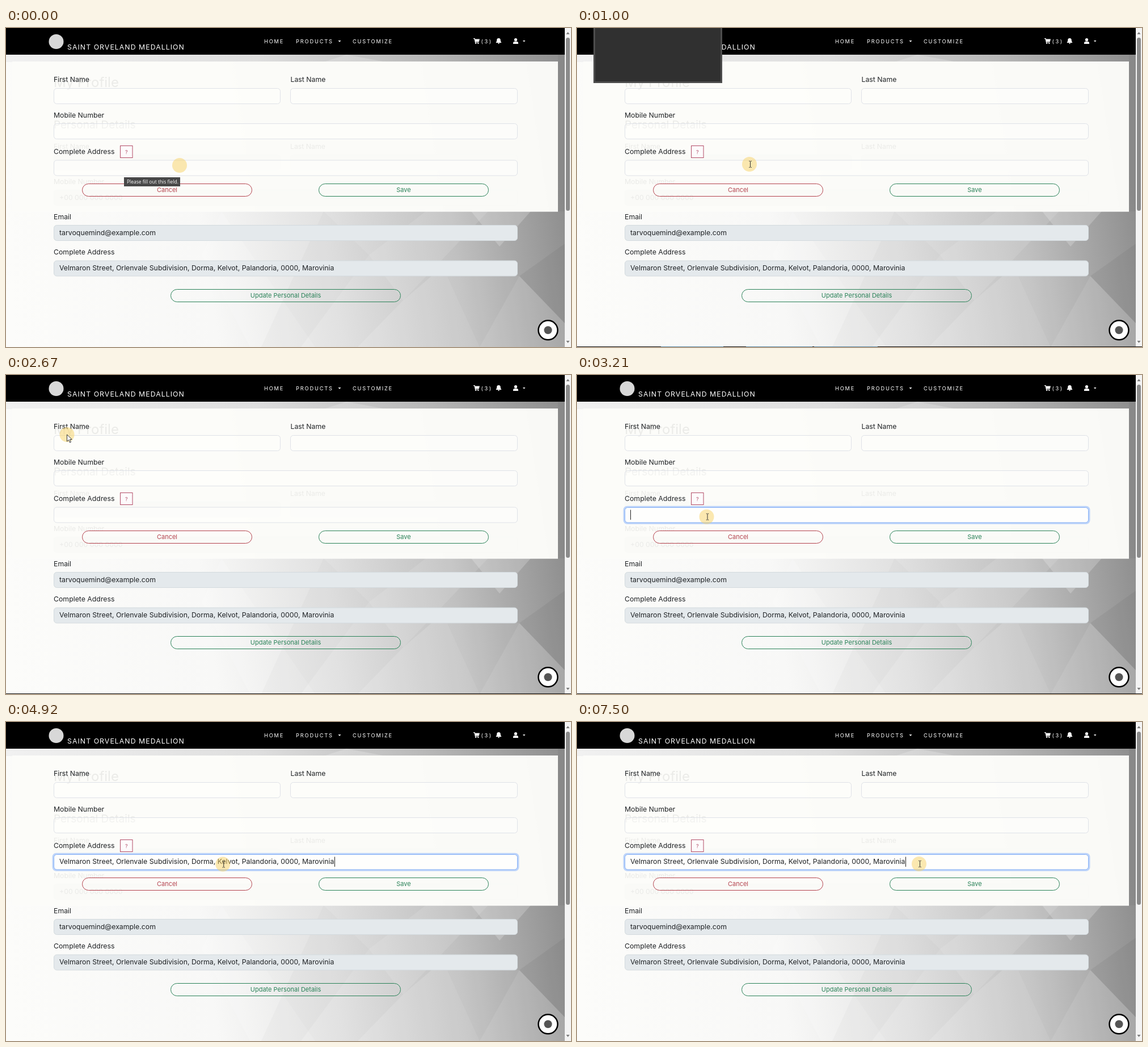
Recreate the animation shown at these times as an HTML page. Size 996 px wide and 562 px high, loop 7.54 s.

```html
<!DOCTYPE html>
<html lang="en">
<head>
<meta charset="utf-8">
<title>Profile form</title>
<style>
  html, body { margin: 0; width: 100%; height: 100%; overflow: hidden; background: #fff; }
  svg { display: block; width: 100%; height: 100%; }
  text { font: 12.3px Inter, sans-serif; fill: #202326; white-space: pre; }
  .nav { font-size: 9.3px; letter-spacing: 1.8px; fill: #fff; }
  .brand { letter-spacing: 1.05px; fill: #fff; }
  .pill { font-size: 11px; text-anchor: middle; }
  .system { font: 8.5px "Open Sans", "Noto Sans", sans-serif; fill: #fff; }
  .strong { font-size: 9.4px; font-weight: 600; }
  .choice { font-size: 9.2px; text-anchor: middle; }
</style>
</head>
<body>
<svg id="stage" viewBox="0 0 996 562" preserveAspectRatio="none">
  <defs>
    <linearGradient id="shade" gradientUnits="userSpaceOnUse" x1="0" y1="480" x2="985" y2="330">
      <stop offset="0" stop-color="#fcfcfa"/>
      <stop offset=".36" stop-color="#f8f8f7"/>
      <stop offset=".58" stop-color="#e1e1e1"/>
      <stop offset=".8" stop-color="#c0c0c0"/>
      <stop offset="1" stop-color="#8f8f8f"/>
    </linearGradient>
    <linearGradient id="band">
      <stop offset="0" stop-color="#f1f1f1"/>
      <stop offset=".45" stop-color="#dedede"/>
      <stop offset=".75" stop-color="#b8b8b8"/>
      <stop offset="1" stop-color="#8e8e8e"/>
    </linearGradient>
  </defs>
  <g id="page"></g>
  <g id="form"></g>
  <g id="focus">
    <rect x="81.5" y="230.7" width="823" height="32" rx="7" fill="#bdd4fa"/>
    <rect x="84.5" y="233.5" width="817" height="26.5" rx="5" fill="#fefefd" stroke="#86b0f5"/>
    <text id="typed" x="94" y="250.3"></text>
    <path id="caret" stroke="#222"/>
  </g>
  <g id="tooltip">
    <rect width="99" height="16" fill="#484848"/>
    <text class="system" x="5" y="11.2">Please fill out this field.</text>
  </g>
  <g id="popup">
    <rect x="29" width="227" height="97" fill="#4d4d4d"/>
    <rect id="popupBody" x="32" width="221" height="94"/>
    <g id="popupContent">
      <text class="system strong" x="42" y="20">http://localhost wants to</text>
      <path d="M232 9l9 9M241 9l-9 9M49 46c-3-3.500-4.800-5-4.800-7.300a4.800 4.800 0 0 1 9.600 0c0 2.300-1.800 3.800-4.800 7.300z" fill="none" stroke="#e8e8e8"/>
      <circle cx="49" cy="39" r="1.700" fill="none" stroke="#e8e8e8"/>
      <text class="system" x="60.500" y="43">Know your location</text>
      <rect x="41" y="61" width="99" height="23" fill="#595959"/>
      <rect x="146.500" y="61.500" width="97" height="22" fill="#4b4b4b" stroke="#d8d8d8"/>
      <text class="system choice" x="91" y="76">Allow</text>
      <text class="system choice" x="194.500" y="76">Block</text>
    </g>
  </g>
  <g id="taskbar">
    <path d="M0 561.500H996" stroke="#111"/>
    <path id="taskItems" d="M148 561.500h110M298 561.500h117M418 561.500h112" stroke="#5f8ba6"/>
  </g>
  <g id="pointer">
    <circle r="13" fill="#f8d164" fill-opacity=".5"/>
    <path id="arrow" d="M0 0V12L3 9.300L5 14L7 13.100L5 8.600H8.800Z" fill="#fff" stroke="#222" stroke-width=".9"/>
    <path id="beam" d="M-.7-5.500H1M2-5.500H3.700M1.500-5V5M-.7 5.500H1M2 5.500H3.700" fill="none" stroke="#333"/>
  </g>
</svg>
<script>
const LOOP = 7540;
const ADDRESS = "Velmaron Street, Orlenvale Subdivision, Dorma, Kelvot, Palandoria, 0000, Marovinia";
const GREEN = "#2a8258", RED = "#b4434e";
const $ = id => document.getElementById(id);

function add(parent, tag, attrs, content = "") {
  const node = document.createElementNS("http://www.w3.org/2000/svg", tag);
  for (const key in attrs) node.setAttribute(key, attrs[key]);
  node.textContent = content;
  return parent.appendChild(node);
}
const rect = (p, x, y, width, height, fill, more) => add(p, "rect", { x, y, width, height, fill, ...more });
const label = (p, x, y, content, more) => add(p, "text", { x, y, ...more }, content);
const shape = (p, d, fill, more) => add(p, "path", { d, fill, ...more });

function field(p, x, y, width, fill, stroke, value) {
  rect(p, x + .5, y + .5, width - 1, 27, fill, { rx: 5, stroke });
  if (value) label(p, x + 10, y + 17.8, value);
}
function pill(p, x, y, width, color, content) {
  rect(p, x + .5, y + .5, width - 1, 22, "none", { rx: 11, stroke: color });
  label(p, x + width / 2, y + 15.3, content, { class: "pill", style: `fill:${color}` });
}

function drawBackdrop(p) {
  rect(p, 0, 0, 996, 562, "url(#shade)");
  rect(p, 0, 47, 985, 13, "url(#band)");
  const facets = [
    ["M380 323L545 562H430L345 400Z", "#fff", .12],
    ["M560 323L640 400L520 562H450Z", "#888", .05],
    ["M640 400L740 323H850L700 480Z", "#fff", .1],
    ["M700 480L620 562H835L770 420Z", "#fff", .14],
    ["M820 323H925L870 385Z", "#fff", .2],
    ["M770 420L905 437L835 562Z", "#fff", .08],
    ["M905 437L985 520V562H835Z", "#fff", .16],
    ["M905 437L985 380V520Z", "#555", .1],
    ["M600 47L670 60H560Z", "#fff", .2],
    ["M973 47H985V323H973Z", "#777", .25]
  ];
  for (const [d, fill, opacity] of facets) shape(p, d, fill, { opacity });
  rect(p, 11, 59, 962, 264.5, "#fff", { opacity: .7 });
}

function drawHeader(p) {
  rect(p, 0, 0, 985, 47, "#000");
  add(p, "circle", { cx: 88.5, cy: 24, r: 13, fill: "#d8d8d8" });
  label(p, 108, 38, "SAINT ORVELAND MEDALLION", { class: "brand" });
  label(p, 455, 26.5, "HOME", { class: "nav" });
  label(p, 511, 26.5, "PRODUCTS", { class: "nav" });
  label(p, 611, 26.5, "CUSTOMIZE", { class: "nav" });
  label(p, 837.5, 26.7, "(3)", { class: "nav", style: "letter-spacing:2.6px" });
  shape(p, "M585.500 22h5l-2.500 2.700zM911 22h4.500l-2.250 2.500z", "#fff");
  shape(p, "M824 18h2.500l.4 1.500H835l-1.300 5h-5.800l.2 1h5.300v1h-6.300L825.500 19.200H824z", "#fff");
  for (const cx of [828, 832.5]) add(p, "circle", { cx, cy: 27, r: 1.1, fill: "#fff" });
  shape(p, "M868.500 18c2.500 0 3.300 1.600 3.300 3.600 0 2 .6 2.700 1.400 3.600v.8h-9.400v-.8c.8-.9 1.400-1.600 1.400-3.600 0-2 .8-3.600 3.300-3.600zM867 26.600h3a1.500 1.500 0 0 1-3 0z", "#fff");
  add(p, "circle", { cx: 898.5, cy: 20.7, r: 2.6, fill: "#fff" });
  shape(p, "M894 28v-1.500c0-1.700 1.300-2.700 3-2.700h3c1.700 0 3 1 3 2.700V28z", "#fff");
}

function drawPage() {
  const p = $("page"), fill = "#e4e9ec", edge = "#d3dade";
  drawBackdrop(p);
  drawHeader(p);
  label(p, 84, 104, "My Profile", { style: "font-size:24px" });
  label(p, 84, 177, "Personal Details", { style: "font-size:19px" });
  label(p, 84, 213, "First Name");
  label(p, 501, 213, "Last Name");
  field(p, 84, 223, 400, fill, edge);
  field(p, 501, 223, 401, fill, edge);
  label(p, 84, 275, "Mobile Number");
  field(p, 84, 285, 818, fill, edge, "+00 000 000 0000");
  label(p, 84, 337, "Email");
  field(p, 84, 347, 818, fill, edge, "tarvoquemind@example.com");
  label(p, 84, 399, "Complete Address");
  field(p, 84, 409.5, 818, fill, edge, ADDRESS);
  pill(p, 290, 460, 406, GREEN, "Update Personal Details");
  add(p, "circle", { cx: 955.5, cy: 532.3, r: 17, fill: "#fff", stroke: "#000", "stroke-width": 2.5 });
  add(p, "circle", { cx: 955.5, cy: 532.3, r: 7, fill: "#555" });
  rect(p, 985, 0, 11, 562, "#f4f4f4");
  rect(p, 987, 17, 7, 305, "#8b8b8b", { rx: 3.5 });
  shape(p, "M987.500 11l3-4 3 4zM987.500 551l3 4 3-4z", "#7c7c7c");
}

function drawForm() {
  const p = $("form"), fill = "rgba(255,255,253,.4)", edge = "#dfe2e8";
  rect(p, 11, 59, 962, 264.5, "#fcfcf9", { opacity: .92 });
  label(p, 84, 95.3, "First Name");
  field(p, 84, 106, 400, fill, edge);
  label(p, 501.5, 95.3, "Last Name");
  field(p, 501, 106, 401, fill, edge);
  label(p, 84, 157.5, "Mobile Number");
  field(p, 84, 168, 818, fill, edge);
  label(p, 84, 222, "Complete Address");
  rect(p, 201.5, 207.5, 21.5, 21, "#fdfbfc", { stroke: "#b24a66" });
  label(p, 212.3, 221.6, "?", { style: "font-size:9px;fill:#b24a66;text-anchor:middle" });
  field(p, 84, 232.5, 818, fill, edge);
  pill(p, 134, 274, 300, RED, "Cancel");
  pill(p, 551, 274, 300, GREEN, "Save");
}

const PATH = [
  [90, 306, 242], [400, 212, 219], [560, 212, 218], [860, 304, 240], [1210, 304, 240],
  [1750, 116, 100], [2000, 92, 76], [2250, 92, 76], [2670, 107.5, 105], [3000, 226, 249],
  [3500, 232.5, 251], [4550, 232.5, 251], [5400, 602, 250], [6750, 602, 250], [7000, 603, 250]
];

function pointerAt(t) {
  const next = PATH.findIndex(key => key[0] > t);
  if (next === 0) return PATH[0].slice(1);
  if (next < 0) return PATH[PATH.length - 1].slice(1);
  const [t0, x0, y0] = PATH[next - 1], [t1, x1, y1] = PATH[next];
  const u = (t - t0) / (t1 - t0), k = u * u * (3 - 2 * u);
  return [x0 + (x1 - x0) * k, y0 + (y1 - y0) * k];
}

const show = (id, visible) => $(id).setAttribute("display", visible ? "inline" : "none");
const during = (t, from, to) => t >= from && t < to;
const overField = (x, y) => x > 84 && x < 902 &&
  [[106, 134], [168, 196], [233, 260]].some(([top, bottom]) => y >= top && y <= bottom);

const FOCUS = 3000, FILL = 4500;

function render(t) {
  const [x, y] = pointerAt(t);
  const beam = overField(x, y);
  $("pointer").setAttribute("transform", `translate(${x} ${y})`);
  show("beam", t >= 90 && beam);
  show("arrow", t >= 90 && !beam);

  show("popup", during(t, 960, 2250));
  show("popupContent", t >= 1210);
  $("popupBody").setAttribute("fill", t < 1210 ? "#303030" : "#474747");
  show("taskbar", during(t, 880, 3400));
  show("taskItems", t < 2250);

  show("tooltip", t < 90 || during(t, 3700, FILL));
  $("tooltip").setAttribute("transform", `translate(${t < 90 ? 208 : 239} 263)`);

  const filled = t >= FILL;
  show("focus", t >= FOCUS);
  show("typed", filled);
  show("caret", (t - (filled ? FILL : FOCUS)) % 1000 < 500);
  $("caret").setAttribute("d", `M${filled ? caretEnd : 94.5} 237.500V255`);
}

drawPage();
drawForm();
$("typed").textContent = ADDRESS;
const caretEnd = Math.round(94 + $("typed").getComputedTextLength()) + .5;

const start = performance.now();
function tick() {
  render((performance.now() - start) % LOOP);
  requestAnimationFrame(tick);
}
render(0);
requestAnimationFrame(tick);
</script>
</body>
</html>
```
